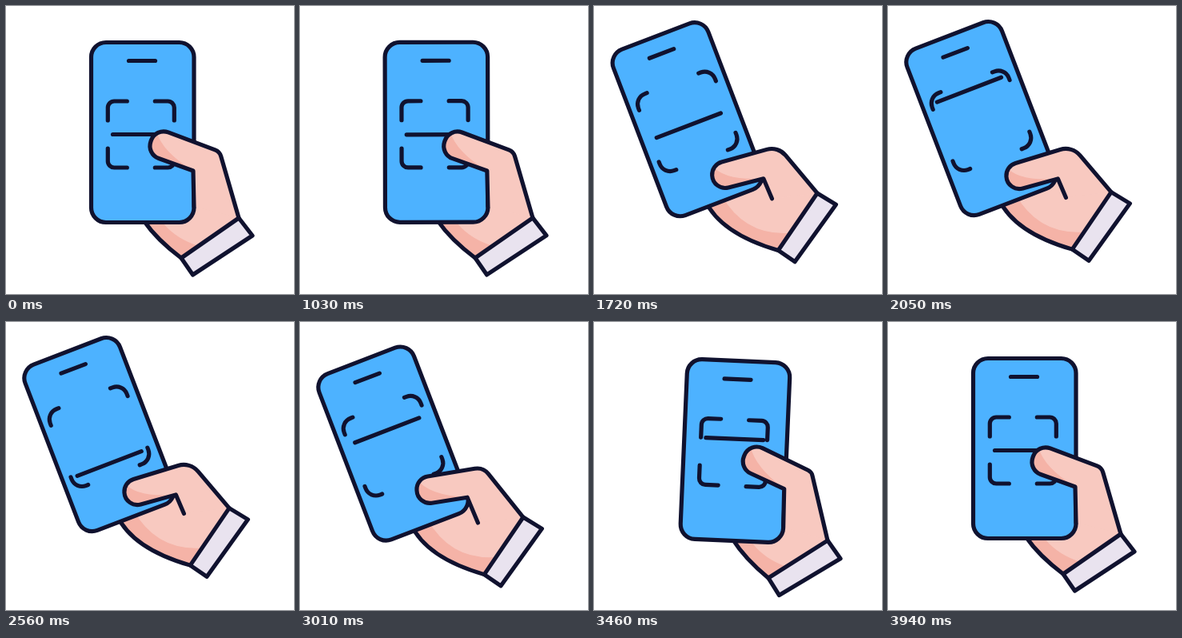
Recreate the animation shown at these times as an HTML page with a canvas. Size 360 by 360 pixels, loop 3970 ms.

```html
<!DOCTYPE html>
<html lang="en">
<head>
<meta charset="utf-8">
<title>Scanning with a phone</title>
<style>
html, body { margin: 0; width: 100%; height: 100%; overflow: hidden; background: #fff; }
canvas { display: block; width: 100vmin; height: 100vmin; }
</style>
</head>
<body>
<canvas id="stage"></canvas>
<script>
const SIZE = 360, LOOP = 3970, STEP = 30;
const INK = '#10122f', BLUE = '#4db2ff', SKIN = '#f8c9c0', SHADE = '#f5b3a7', CUFF = '#e9e3ef';
const WRIST = { x: 271, y: 311.5 };
const START = 1000, SWING = 1165, FIRST_PEAK = 1460;

const canvas = document.getElementById('stage');
const ctx = canvas.getContext('2d');
const dpr = window.devicePixelRatio || 1;
canvas.width = canvas.height = SIZE * dpr;

const clamp = (v, lo, hi) => Math.min(hi, Math.max(lo, v));
const mix = (a, b, u) => a + (b - a) * u;
const mixPoint = (p, q, u) => [mix(p[0], q[0], u), mix(p[1], q[1], u)];

// Smooth 0 to 1 between two times.
function ease(t, from, to) {
  const u = clamp((t - from) / (to - from), 0, 1);
  return u * u * (3 - 2 * u);
}

function pose(t) {
  const lift = ease(t, START, 1750);
  const back = ease(t, 3010, 3440);
  const settle = ease(t, 3440, 3700);

  // The scan line swings 1.5 times between its first peak and last trough.
  const swingTime = clamp(t - FIRST_PEAK, 0, 1.5 * SWING);
  const swing = Math.cos(2 * Math.PI * swingTime / SWING);
  const reach = ease(t, START, FIRST_PEAK) - ease(t, FIRST_PEAK + 1.5 * SWING, 3660);

  return {
    angle: -21 * lift + 23.5 * back - 2.5 * settle,
    x: WRIST.x + 6 * lift - 7 * back + settle,
    y: WRIST.y - 29 * ease(t, START, 1830) + 38.5 * ease(t, 2800, 3380)
      - 14 * ease(t, 3380, 3690) + 4.5 * ease(t, 3690, 3940),
    open: ease(t, START, 1600) - ease(t, 3010, 3420),
    bend: ease(t, START, 1870) - 1.17 * ease(t, 2750, 3350) + 0.17 * settle,
    scan: mix(3, 1.5 + 40.5 * swing, reach)
  };
}

function line(...pts) {
  ctx.beginPath();
  pts.forEach(p => ctx.lineTo(...p));
}

function fill(color) { ctx.fillStyle = color; ctx.fill(); }

function palmEdge() {
  ctx.beginPath();
  ctx.moveTo(155, 222);
  ctx.quadraticCurveTo(158, 269, 219, 315);
}

function drawPalm() {
  palmEdge();
  ctx.lineTo(291, 265);
  ctx.lineTo(262, 217);
  fill(SKIN);
  palmEdge();
  ctx.lineTo(241, 300);
  ctx.quadraticCurveTo(186, 283, 177, 225);
  fill(SHADE);
  palmEdge();
  ctx.stroke();
}

function drawPhone(open, scan) {
  ctx.save();
  ctx.translate(170.5, 157.5 - 39 * open);
  ctx.beginPath();
  ctx.roundRect(-64, -112, 128.5, 225, 18.5);
  fill(BLUE);
  ctx.stroke();

  line([-17, -89], [16, -89]);
  ctx.stroke();

  // Viewfinder corners spread and round off as the phone opens up.
  const half = 41.5 + 10.5 * open, arm = 24 - 7 * open, r = 8 + 6 * open;
  for (const sx of [-1, 1]) for (const sy of [-1, 1]) {
    const cx = -1.7 + open + sx * half, cy = 3 + sy * half;
    ctx.beginPath();
    ctx.moveTo(cx, cy - sy * arm);
    ctx.arcTo(cx, cy, cx - sx * r, cy, r);
    ctx.lineTo(cx - sx * arm, cy);
    ctx.stroke();
  }

  const w = 36 + 7.5 * open;
  line([-1 - w, scan], [-1 + w, scan]);
  ctx.stroke();
  ctx.restore();
}

function drawThumb(bend) {
  const web = mixPoint([234, 206], [234, 225], bend);
  const low = mixPoint([175.5, 185], [168, 218.5], bend);
  const high = mixPoint([187, 152], [178, 186.5], bend);
  const knuckle = mixPoint([267, 182], [265.7, 192.7], bend);
  const wrist = [291, 265];

  const outline = () => {
    line([235, 251], web);
    ctx.arcTo(...low, ...high, 16.5);
    ctx.arcTo(...high, ...knuckle, 16.5);
    ctx.arcTo(...knuckle, ...wrist, mix(12, 24, bend));
    ctx.lineTo(...wrist);
  };
  outline();
  fill(SKIN);

  ctx.save();
  ctx.clip();
  const fold = mixPoint(mixPoint(low, web, 0.3), high, 0.3);
  line(low, high);
  ctx.quadraticCurveTo(...fold, ...web);
  fill(SHADE);
  ctx.restore();

  outline();
  ctx.stroke();
}

function drawCuff() {
  line([291, 265], [308, 287], [233.5, 336], [219, 315]);
  ctx.closePath();
  fill(CUFF);
  ctx.stroke();
}

function draw(t) {
  const p = pose(t);
  const scale = 1 - 0.013 * p.open;

  ctx.setTransform(dpr, 0, 0, dpr, 0, 0);
  ctx.fillStyle = '#fff';
  ctx.fillRect(0, 0, SIZE, SIZE);
  ctx.strokeStyle = INK;
  ctx.lineWidth = 5.2;
  ctx.lineCap = ctx.lineJoin = 'round';

  ctx.translate(p.x, p.y);
  ctx.rotate(p.angle * Math.PI / 180);
  ctx.scale(scale, scale);
  ctx.translate(-WRIST.x, -WRIST.y);
  drawPalm();
  drawPhone(p.open, p.scan);
  drawThumb(p.bend);
  drawCuff();
}

function tick() {
  const t = performance.now() % LOOP;
  draw(Math.floor((t - 10) / STEP) * STEP + 10);
  requestAnimationFrame(tick);
}
tick();
</script>
</body>
</html>
```
